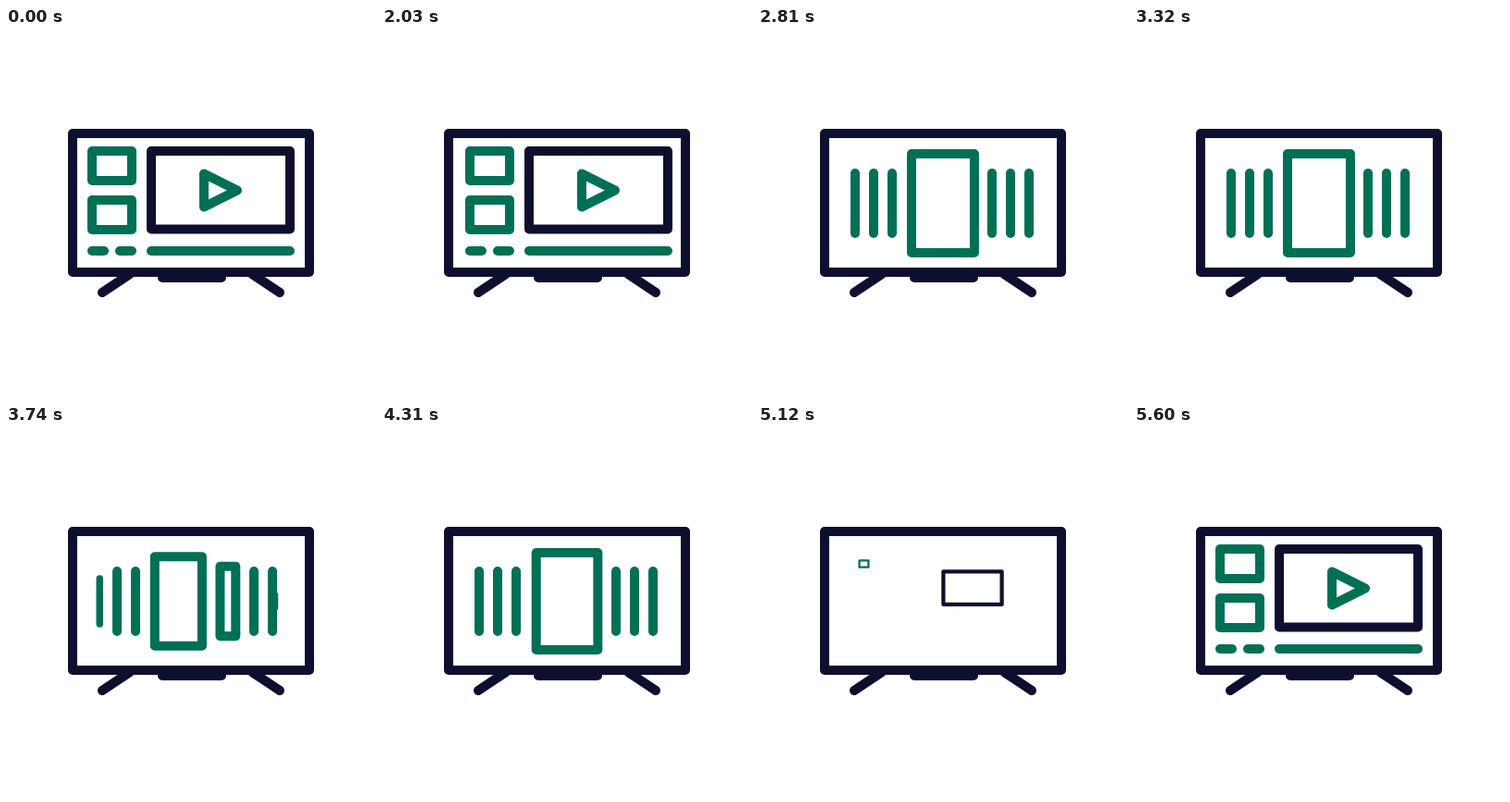
Animation, 400 px wide and 400 px high, one loop 5660 ms. Source, as an HTML page:

```html
<!DOCTYPE html>
<html lang="en">
<head>
<meta charset="utf-8">
<title>Television</title>
<style>
  html, body { margin: 0; width: 100%; height: 100%; overflow: hidden; background: #fff; }
  svg { display: block; width: 100vw; height: 100vh; }
  svg * { fill: none; stroke-width: 10; stroke-linecap: round; stroke-linejoin: round; }
  .navy { stroke: #0e0f2e; }
  .green { stroke: #007054; }
</style>
</head>
<body>
<svg viewBox="0 0 400 400">
  <clipPath id="screen"><rect x="76" y="118" width="248" height="143"/></clipPath>
  <g clip-path="url(#screen)">
    <g id="home"></g>
    <g id="carousel"></g>
  </g>
  <g class="navy">
    <path d="M104 286L134 266M296 286L266 266M169 270H233"/>
    <rect x="72" y="114" width="256" height="150"/>
  </g>
</svg>
<script>
const LOOP = 5660, STEP = 30, PHASE = 20;
const home = document.getElementById('home');
const carousel = document.getElementById('carousel');

const mix = (a, b, u) => a + (b - a) * u;
const span = (t, from, to) => Math.min(1, Math.max(0, (t - from) / (to - from)));
const inOut = u => u < .5 ? 2 * u * u : 1 - 2 * (1 - u) * (1 - u);
const out = u => 1 - (1 - u) ** 3;
const ease = (t, from, to) => inOut(span(t, from, to));

function addPath(parent, color) {
  const el = document.createElementNS('http://www.w3.org/2000/svg', 'path');
  el.setAttribute('class', color);
  return parent.appendChild(el);
}

// Home screen: shapes grow from their centre, lines from their left end.
const shapes = [
  ['navy', 'M157 133H307V217.5H157Z', 232, 175, 5040, 5520],
  ['green', 'M93 133H136V165H93Z', 114.5, 149, 5080, 5560],
  ['green', 'M93 186H136V218H93Z', 114.5, 202, 5120, 5590],
  ['green', 'M214 157.5V193.5L250 175.5Z', 226, 175.5, 5160, 5600]
].map(([color, d, x, y, from, to]) => {
  const el = addPath(home, color);
  el.setAttribute('d', d);
  return { el, x, y, from, to };
});
const lines = [[93, 106, 5200, 5540], [123, 136, 5240, 5570], [157, 307, 5180, 5610]]
  .map(([a, b, from, to]) => ({ el: addPath(home, 'green'), a, b, from, to }));

// Carousel slots: centre x, half width, half height, line weight.
const slots = [
  [90, 0, 0, 0], [105, 0, 32.5, 10], [125, 0, 32.5, 10], [145, 0, 32.5, 10],
  [200, 34, 53.5, 10],
  [253, 0, 32.5, 10], [273, 0, 32.5, 10], [293, 0, 32.5, 10], [293, 0, 0, 0]
];
const cards = Array.from({ length: 8 }, () => addPath(carousel, 'green'));

function drawHome(t) {
  const back = t > 4600;
  home.setAttribute('transform', `translate(${back ? 0 : 250 * ease(t, 1995, 2555)} 0)`);
  for (const { el, x, y, from, to } of shapes) {
    const s = back ? out(span(t, from, to)) : 1;
    el.style.display = s ? '' : 'none';
    el.setAttribute('transform', `translate(${x} ${y}) scale(${s}) translate(${-x} ${-y})`);
  }
  for (const { el, a, b, from, to } of lines) {
    const u = back ? out(span(t, from, to)) : 1;
    el.style.display = u ? '' : 'none';
    el.setAttribute('d', `M${a} 241H${mix(a, b, u)}`);
  }
}

function carouselShift(t) {
  if (t < 3000) return mix(-7, 0, ease(t, 2240, 2815));
  return t < 3500 ? ease(t, 3055, 3325) % 1 : ease(t, 3565, 3835) % 1;
}

function drawCarousel(t) {
  carousel.style.display = t > 2240 && t < 5180 ? '' : 'none';
  carousel.setAttribute('transform', `translate(0 ${-145 * ease(t, 4735, 5165)})`);
  const shift = carouselShift(t);
  const press = 1 - .15 * (ease(t, 4265, 4440) - ease(t, 4440, 4625));
  cards.forEach((el, i) => {
    const pos = Math.max(0, i + shift);
    const k = Math.min(7, Math.floor(pos));
    let [x, w, h, weight] = slots[k].map((v, j) => mix(v, slots[k + 1][j], pos - k));
    if (i === 4) { w *= press; h *= press; }
    el.style.strokeWidth = weight;
    el.setAttribute('d', `M${x - w} ${189.5 - h}H${x + w}V${189.5 + h}H${x - w}Z`);
  });
}

const start = performance.now();
function frame() {
  const now = (performance.now() - start) % LOOP;
  const t = Math.max(0, Math.floor((now - PHASE) / STEP) * STEP + PHASE);
  drawHome(t);
  drawCarousel(t);
  requestAnimationFrame(frame);
}
frame();
</script>
</body>
</html>
```
